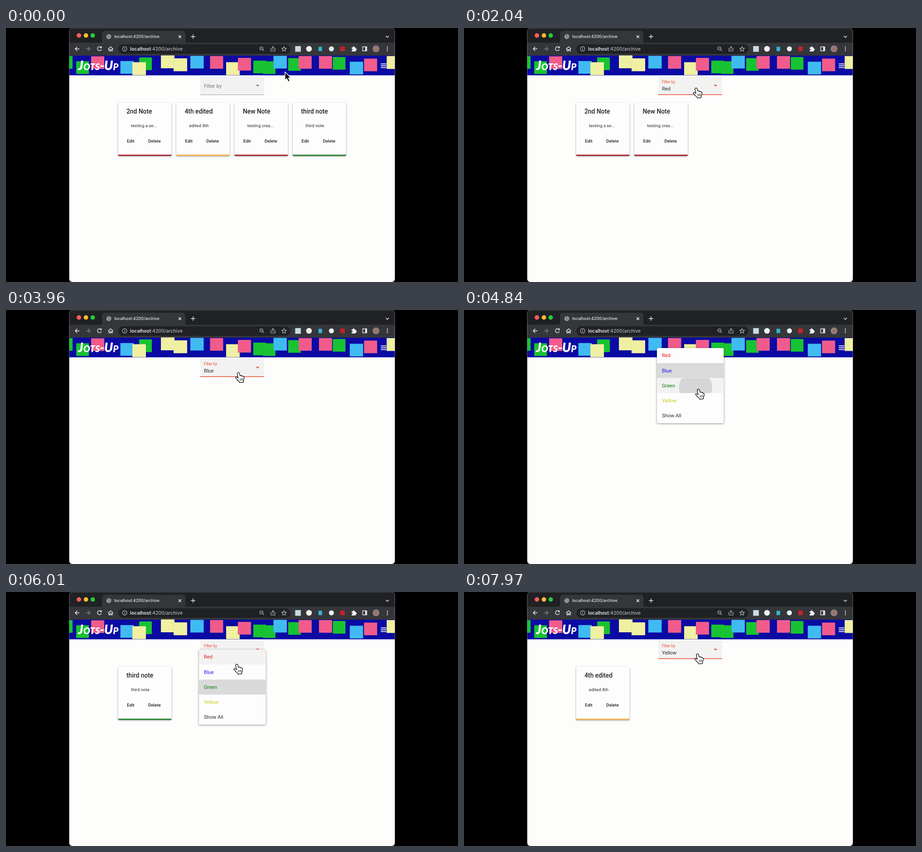
An HTML page that plays this animation: 998x561 px, repeating every 8000 ms.

```html
<!DOCTYPE html>
<html lang="en">
<head>
<meta charset="utf-8">
<title>Archive</title>
<style>
  html, body { margin: 0; width: 100%; height: 100%; overflow: hidden; background: #000; }
  svg { display: block; width: 998px; height: 561px; font-family: Roboto, sans-serif; }
  .tab, .url { font-family: Inter, sans-serif; font-weight: 500; fill: #e8eaed; }
  .tab { font-size: 9px; }
  .url { font-size: 10.4px; }
  .icon { fill: none; stroke: #e8eaed; stroke-width: 1.4; }
  .logo { font: italic 900 28px Lato, sans-serif; font-variant: small-caps; fill: #fff; }
  .title { font-size: 13.8px; font-weight: 500; fill: #222; }
  .body { font-size: 9.66px; fill: #2c2c2c; }
  .button { font-size: 9.7px; font-weight: 500; fill: #222; }
  .option { font-size: 11.1px; }
  .card { filter: drop-shadow(0 1.3px 1.4px rgba(0,0,0,.46)); }
  .sheet { filter: drop-shadow(0 1.5px 2px rgba(0,0,0,.45)); }
  #papers { filter: blur(.4px); }
</style>
</head>
<body>
<svg viewBox="0 0 998 561">
  <defs>
    <clipPath id="window"><rect x="139.6" width="719" height="561" rx="7"/></clipPath>
    <clipPath id="rowClip"><rect id="rowBox" x="426" width="147.5" height="33.2"/></clipPath>
    <radialGradient id="portrait"><stop stop-color="#a56a58"/><stop offset="1" stop-color="#8b8586"/></radialGradient>
  </defs>
  <rect width="998" height="561"/>
  <g clip-path="url(#window)">
    <rect x="139" width="720" height="561" fill="#fdfdfc"/>
    <rect x="139" width="720" height="34" fill="#202124"/>
    <path d="M206 34q6 0 6-6V13q0-7 7-7h170q7 0 7 7v15q0 6 6 6z" fill="#35363a"/>
    <rect x="139" y="32.5" width="720" height="28.5" fill="#35363a"/>
    <rect x="248" y="36" width="380" height="21" rx="10.5" fill="#202124"/>
    <circle cx="161" cy="16.5" r="4.9" fill="#ff5f57"/>
    <circle cx="176.5" cy="16.5" r="4.9" fill="#febc2e"/>
    <circle cx="191.5" cy="16.5" r="4.9" fill="#28c840"/>
    <circle cx="227" cy="19" r="5.4" fill="#9aa0a6"/>
    <path d="M223 17l3-2 2 2-2 2 1 3M228 22l3-3" stroke="#45474b" fill="none"/>
    <text class="tab" x="239" y="22.3">localhost:4200/archive</text>
    <text class="url" x="274" y="50"><tspan font-weight="600">localhost</tspan><tspan fill="#b4b7bb">:4200/archive</tspan></text>
    <g class="icon">
      <path d="M381 16.2l5.8 5.8m0-5.8L381 22M413 14.2v9.6M408.2 19h9.6M838.5 17.5l3.5 3.3 3.5-3.3"/>
      <path d="M162 46h-9m4.3-4.4L152.8 46l4.5 4.4"/>
      <path d="M176.500 46h9m-4.3-4.4L185.7 46l-4.5 4.4" stroke="#7d8084"/>
      <path d="M210 43a4.5 4.5 0 1 0 .6 4.3M210.7 40.7v3.2h-3.3"/>
      <path d="M225.5 46.3l5.5-4.9 5.5 4.9M227.3 45v5.5h2.5v-3h2.5v3h2.500V45"/>
      <g stroke="#b8bbbf" stroke-width="1.2">
        <circle cx="262" cy="46" r="4.9"/><path d="M262 45v3.5M262 43v1.2"/>
        <circle cx="563.8" cy="45" r="3.5"/><path d="M566.3 47.5l3.2 3.2M562 45h3.6"/>
        <path d="M587 45h-2v6h9v-6h-2M589.5 48.5v-7.5m-2.2 2.2l2.2-2.2 2.2 2.2"/>
        <path d="M614 41l1.5 3.4 3.7.4-2.8 2.5.8 3.7-3.2-1.9-3.2 1.9.8-3.7-2.8-2.5 3.7-.4z"/>
      </g>
      <path d="M787.5 41.5h9v9h-9zM794.5 41.5v9"/>
    </g>
    <path d="M793 41h4v10h-4z" fill="#e8eaed"/>
    <rect x="638.5" y="40" width="12.5" height="12.5" fill="#c9dbe2"/>
    <circle cx="669" cy="46" r="6.3" fill="#f1f1f1"/>
    <rect x="690" y="41.5" width="8" height="9.5" fill="#35b3d3"/>
    <circle cx="718.5" cy="46" r="5.5" fill="#eef1f3"/>
    <rect x="738" y="41" width="10" height="10" fill="#c4202c"/>
    <path d="M763 43h2.8a1.9 1.9 0 1 1 3.6 0h2.8v2.7a1.8 1.8 0 1 1 0 3.5v2.6H763v-2.7a1.8 1.8 0 1 0 0-3.4z" fill="#f0f1f2"/>
    <circle cx="817" cy="46" r="7.5" fill="url(#portrait)"/>
    <g fill="#e8eaed"><circle cx="842" cy="42" r="1.2"/><circle cx="842" cy="46" r="1.2"/><circle cx="842" cy="50" r="1.2"/></g>

    <rect x="139" y="61" width="720" height="43.5" fill="#0b0ba3"/>
    <g id="papers"></g>
    <text class="logo" x="159" y="92.5">Jots-Up</text>
    <path d="M827.5 79.3h12.5m-12.5 4h12.5m-12.5 4h12.5" stroke="#fff" stroke-width="1.7"/>

    <g id="cards"></g>
    <path d="M429 148v-37.5q0-3.5 3.5-3.5h134q3.5 0 3.5 3.5V148z" fill="#f2f2f2"/>
    <rect id="underline" x="429" width="141"/>
    <path id="caret" d="M551.8 125.6h7.4l-3.7 3.8z"/>
    <text id="label" x="437">Filter by</text>
    <text id="value" class="option" x="437" y="137.5" fill="#2b2b2b"></text>
    <g id="panel">
      <rect class="sheet" x="426" width="147.5" height="166" rx="3" fill="#fdfdfd"/>
      <rect id="chosen" x="426" width="147.5" height="33.2" fill="#dadada"/>
      <rect id="hover" x="426" width="147.5" height="33.2" fill="#f2f2f2"/>
      <g clip-path="url(#rowClip)"><circle id="ripple" fill="#000" fill-opacity=".12"/></g>
      <g id="options"></g>
    </g>
    <rect x="140.100" y=".5" width="718" height="560" rx="6.5" fill="none" stroke="#fff" stroke-opacity=".16"/>
  </g>
  <g id="arrow">
    <path d="M0 0V18.2L4.1 14.6 7 21.7 10.5 20.2 7.5 13.2H13.1Z" stroke="#fff" stroke-width="1.4" stroke-linejoin="round"/>
  </g>
  <g id="hand">
    <g transform="translate(-.7 -.8) scale(1.03)" fill="#fff" stroke="#222" stroke-width="1.4" stroke-linejoin="round" stroke-linecap="round">
      <path d="M-2.2 2.8C-2.6 0 1.8-.8 2.6 2L4 7.2C5 6 7 6.3 7.2 7.8 8.4 6.8 10 7.5 10.2 9 11.6 8.3 12.8 9.4 12.7 11 12.7 14.5 11.8 16 11 18V21L2.8 21.7 2 19.7C-1 17.5-3.5 14.5-5.5 12-6.5 10.3-4.6 9-3 10L-.2 12Z"/>
      <path d="M3.9 13.2l.4 4.3m2.3-4.5l.3 4.3m2.3-4.5l.1 4.3" fill="none" stroke-width="1"/>
    </g>
  </g>
</svg>
<script>
const LOOP = 8000, ROW = 33.2, LEFT = 426, WIDTH = 147.5;
const $ = id => document.getElementById(id);
const set = (el, attrs) => { for (const k in attrs) el.setAttribute(k, attrs[k]); };
const clamp = v => Math.min(1, Math.max(0, v));
const easeOut = p => 1 - (1 - clamp(p)) ** 3;
const smooth = p => p * p * (3 - 2 * p);

const papers = [
  { fill: '#18c332', w: 28, h: 28, spots: [[119, 62], [155, 73.5], [294, 65], [546, 72], [567, 73.5], [623, 66.500], [721.5, 64]] },
  { fill: '#40bbf2', w: 29.5, h: 28, spots: [[252.5, 73], [407, 61.5], [590.5, 61.5], [759, 74.5]] },
  { fill: '#f0f0a2', w: 30, h: 28.5, spots: [[279, 75.5], [342, 60.5], [370, 67], [486, 75.5], [840.5, 62]] },
  { fill: '#f15b8c', w: 29, h: 28, spots: [[188, 62.5], [450.5, 62], [512, 66], [646, 62], [691, 62], [790.5, 67.5]] }
];
$('papers').innerHTML = papers.map(({ fill, w, h, spots }) => spots.map(([x, y]) =>
  `<rect x="${x}" y="${y}" width="${w}" height="${h}" fill="${fill}" stroke="#000" stroke-opacity=".12" stroke-width=".5"/>`
).join('')).join('');

const notes = [
  { title: '2nd Note', body: 'testing a se...', tag: 'Red', bar: '#a51d28' },
  { title: '4th edited', body: 'edited 4th', tag: 'Yellow', bar: '#efae49' },
  { title: 'New Note', body: 'testing crea...', tag: 'Red', bar: '#a51d28' },
  { title: 'third note', body: 'third note', tag: 'Green', bar: '#1f7d2f' }
];
const cardMarkup = (note, i) => `<g transform="translate(${247.5 + i * 128.5} 165)">
  <rect class="card" width="118" height="117.5" rx="2.5" fill="#fdfdfd"/>
  <path d="M0 114.8h118v.7q0 2-2 2H2q-2 0-2-2z" fill="${note.bar}"/>
  <text class="title" x="18.5" y="23.7">${note.title}</text>
  <text class="body" x="28.3" y="54.2">${note.body}</text>
  <text class="button" x="19.5" y="88.3">Edit</text>
  <text class="button" x="66.5" y="88.3">Delete</text></g>`;

const options = [['Red', '#e8141c'], ['Blue', '#1c1cec'], ['Green', '#0a800f'], ['Yellow', '#cbcb18'], ['Show All', '#2b2b2b']];
$('options').innerHTML = options.map(([name, fill], i) =>
  `<text class="option" x="437" y="${20.4 + i * ROW}" fill="${fill}">${name}</text>`).join('');

// Each pick: menu opens, button goes down, button goes up and the choice applies.
const picks = [
  { open: 600, down: 1080, up: 1160, top: 117, choice: 0 },
  { open: 2160, down: 3330, up: 3420, top: 117, choice: 1 },
  { open: 4260, down: 4804, up: 4890, top: 84, choice: 2 },
  { open: 5700, down: 6860, up: 6950, top: 127, choice: 3 }
];

// Pointer track: time, x, y
const track = [
  [0, 616, 97], [120, 613, 98], [520, 520, 134], [830, 507, 143.5], [1160, 507, 141],
  [2040, 513, 133], [2250, 513, 133], [3250, 521, 164], [3450, 521, 164], [4050, 513, 137],
  [4300, 512, 136], [4790, 511, 170], [4840, 518, 175.5], [5000, 519, 174], [5500, 512, 138],
  [5720, 511, 140], [6010, 510, 160], [6800, 515, 240], [6980, 515, 240], [7600, 516, 147], [8000, 516, 137]
];
function pointerAt(t) {
  const i = Math.max(1, track.findIndex(p => p[0] > t));
  const [a, b] = [track[i - 1], track[i]];
  const p = smooth((t - a[0]) / (b[0] - a[0]));
  return [a[1] + (b[1] - a[1]) * p, a[2] + (b[2] - a[2]) * p];
}

let shown;
function showNotes(tag) {
  if (tag === shown) return;
  shown = tag;
  $('cards').innerHTML = notes.filter(n => !tag || n.tag === tag).map(cardMarkup).join('');
  $('value').textContent = tag;
}

function drawField(t) {
  const focused = t >= picks[0].open;
  const float = easeOut((t - picks[0].open) / 250);
  const accent = focused ? '#ee4b30' : '#757575';
  set($('underline'), { y: focused ? 146.5 : 147.2, height: focused ? 1.5 : .8, fill: focused ? accent : '#8e8e96' });
  set($('caret'), { fill: accent });
  set($('label'), { y: 131.8 - 9.4 * float, fill: accent, 'font-size': 11.1 - 2.8 * float });
}

function drawPanel(t, pick, selected, x, y) {
  const visible = pick && t < pick.up + 100;
  $('panel').style.display = visible ? '' : 'none';
  if (!visible) return false;
  const grow = easeOut((t - pick.open) / 120);
  const fade = clamp((t - pick.up) / 100);
  set($('panel'), { opacity: grow * (1 - fade), transform: `translate(0 ${pick.top}) scale(1 ${.8 + .2 * grow})` });
  const inside = x >= LEFT && x <= LEFT + WIDTH && y >= pick.top && y < pick.top + 5 * ROW;
  const row = Math.floor((y - pick.top) / ROW);
  set($('chosen'), { y: selected * ROW, opacity: selected < 0 ? 0 : 1 });
  set($('hover'), { y: row * ROW, opacity: inside && row !== selected ? 1 : 0 });
  const [cx, cy] = pointerAt(pick.down);
  set($('rowBox'), { y: pick.choice * ROW });
  set($('ripple'), { cx: cx - 1, cy: cy - pick.top, r: 88 * easeOut((t - pick.down) / 225) });
  return inside && t < pick.up;
}

function render() {
  const t = performance.now() % LOOP;
  const [x, y] = pointerAt(t);
  const pick = picks.filter(p => t >= p.open).pop();
  const done = picks.filter(p => t >= p.up).pop();
  const before = picks.filter(p => pick && p.up < pick.open).pop();

  showNotes(done ? options[done.choice][0] : '');
  drawField(t);
  const overPanel = drawPanel(t, pick, before ? before.choice : -1, x, y);
  const menuOpen = pick && t < pick.up;
  const overField = !menuOpen && x > 429 && x < 570 && y > 107 && y < 148;
  const hand = overPanel || overField;
  $('hand').style.display = hand ? '' : 'none';
  $('arrow').style.display = hand ? 'none' : '';
  set($(hand ? 'hand' : 'arrow'), { transform: `translate(${x} ${y})` });
  requestAnimationFrame(render);
}
render();
</script>
</body>
</html>
```
